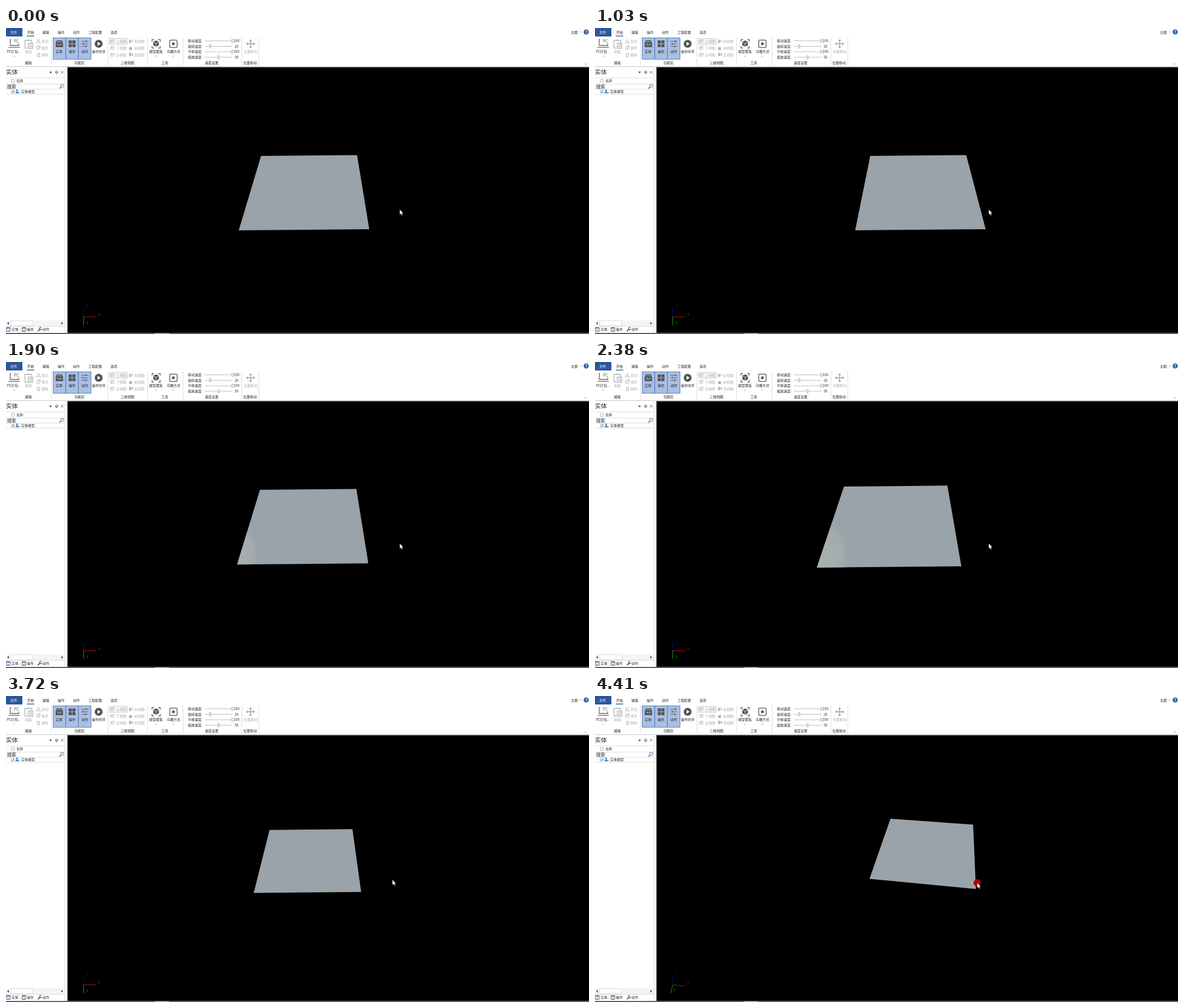
An HTML page for the animation above (4470 ms loop, 1032 px wide and 543 px high).

```html
<!DOCTYPE html>
<html lang="zh">
<head>
<meta charset="utf-8">
<style>
  html, body { margin: 0; width: 100%; height: 100%; overflow: hidden; background: #fff; }
  svg { display: block; }
  text { font-family: "Noto Sans CJK SC", "Noto Sans CJK", "Noto Sans", sans-serif; font-size: 6px; fill: #222; }
  .mid { text-anchor: middle; }
  .off { fill: #aaa; }
  .line { fill: none; stroke: #666; }
  .faint { fill: none; stroke: #b4b4b4; }
  .rule { fill: none; stroke: #ddd; }
</style>
</head>
<body>
<svg width="1032" height="543" viewBox="0 0 1032 543">
  <defs>
    <radialGradient id="glow" gradientUnits="userSpaceOnUse" cx="402" cy="345" r="56" gradientTransform="translate(402 345) scale(.86 1.25) translate(-402 -345)">
      <stop offset="0" stop-color="#a8b0af"/>
      <stop offset=".75" stop-color="#a3abae"/>
      <stop offset="1" stop-color="#9aa3a9" stop-opacity="0"/>
    </radialGradient>
    <g id="chev"><path d="M-1.5-.7 0 .8 1.5-.7" fill="none" stroke="#666" stroke-width=".7"/></g>
    <g id="cube"><path class="faint" d="M1 2h6l-2 2h-5zM0 4v3h5l2-2"/></g>
  </defs>
  <rect width="1032" height="543" fill="#fff"/>

  <!-- tab bar -->
  <rect width="29" height="15" fill="#2b579a"/>
  <rect x="37" y="13.5" width="13" height="1.5" fill="#2b6cb8"/>
  <use href="#chev" x="1017.5" y="7"/>
  <circle cx="1027" cy="7" r="4.5" fill="#2b62ae"/>
  <text class="mid" x="1027" y="9.7" style="fill:#fff;font-weight:700;font-size:7px">?</text>

  <!-- ribbon -->
  <path class="rule" d="M80.5 17V67M180.5 17V67M250.5 17V67M313.5 17V67M417.5 17V67M447.5 17V67"/>
  <path d="M0 68.5H1032" stroke="#c8c8c8"/>
  <path d="M1024.3 64.7l1.7-1.6 1.7 1.6" fill="none" stroke="#666" stroke-width=".7"/>
  <path class="line" stroke-width="1.3" d="M9 20.5H7.5V31H22.5V27.5M4.5 34.3H24.500"/>
  <text class="mid" x="18.500" y="25.500" style="font-size:7px;fill:#555">PC</text>
  <use href="#chev" x="14.500" y="50"/><use href="#chev" x="265.500" y="50"/><use href="#chev" x="296" y="50"/>
  <path class="faint" stroke="#aaa" stroke-width="1.3" d="M38 35.500H33.500V22H45.500V26M37 21.500H42.500M39.500 27H47.500V36H39.500zM41.500 30H46M41.500 33H46"/>
  <path class="faint" d="M54.500 20 60 26M60 20 54.500 26M54.500 33h4v5h-4zM56.500 31.500h4v5M54.500 45.500h6M55.500 46v5h4v-5"/>
  <circle class="faint" cx="55" cy="26" r="1"/><circle class="faint" cx="60" cy="26" r="1"/>

  <g fill="#a9bfe3" stroke="#3e6db5" stroke-width=".8">
    <rect x="83.400" y="17.400" width="22.400" height="38"/>
    <rect x="105.800" y="17.400" width="22.400" height="38"/>
    <rect x="128.200" y="17.400" width="22.400" height="38"/>
  </g>
  <g fill="#555">
    <path d="M90 22h9l2 5v7H88v-7z"/>
    <path d="M111 22h5.500v5.500H111zM117.500 22h5.500v5.500h-5.500zM111 28.500h5.500V34H111zM117.500 28.500h5.500V34h-5.500z"/>
    <circle cx="164" cy="28" r="7"/>
  </g>
  <path d="M91 24.500h7M90 28.500h2.500v2h4v-2h2.500" fill="none" stroke="#a9bfe3"/>
  <path class="line" d="M133.500 23.500h12M133.500 28h12M133.500 32.500h12"/>
  <path class="line" stroke-width="1.500" d="M142 21.800v3.400M137 26.300v3.400M141 30.800v3.400"/>
  <path d="M162 24.500v7l5.500-3.500z" fill="#fff"/>

  <rect x="183.500" y="18.500" width="31" height="10.500" fill="#f6f6f6" stroke="#ccc"/>
  <use href="#cube" x="185" y="19"/><use href="#cube" x="185" y="31"/><use href="#cube" x="185" y="43"/>
  <g fill="#b0b0b0">
    <path d="M218 22l3-2v6l-3 1zM222.500 20l2 2-2 5zM218 34h5v5h-5zM218 44h3v6h-3zM222 45h2.500v4H222z"/>
  </g>
  <path class="line" stroke-width="1.400" d="M258.500 24V20.500H262M269.500 20.500H273V24M258.500 32V35.500H262M269.500 35.500H273V32"/>
  <path d="M265.700 22l5 2.500v6l-5 3-5-3v-6z" fill="#555"/>
  <path d="M261 25l4.700 2.300L270.500 25M265.700 27.500V33" fill="none" stroke="#fff" stroke-width=".8"/>
  <rect class="line" x="289.800" y="21.500" width="13" height="13" rx="1.500" stroke-width="1.500"/>
  <rect x="294" y="25.800" width="4.500" height="4.500" fill="#555"/>
  <path d="M433 21v14M426 28h14M431 23l2-2 2 2M431 33l2 2 2-2M428 26l-2 2 2 2M438 26l2 2-2 2" fill="none" stroke="#a4a4a4" stroke-width="1.400"/>

  <!-- entity panel -->
  <path class="rule" d="M0 88.500H104M0 99.500H104M0 108.500H104M0 117.500H104M104.500 70V541"/>
  <path d="M76.500 77.500h5l-2.500 3z" fill="#444"/>
  <path d="M88 76.500h3.500v3H88zM87.300 79.500h4.800M89.700 79.500V82M97.300 76.300l4.200 4.400M101.500 76.300l-4.200 4.400" fill="none" stroke="#444" stroke-width=".8"/>
  <path d="M9.500 91.500h5v5h-5zM9.500 110.500h5v5h-5z" fill="#fff" stroke="#999" stroke-width=".7"/>
  <path d="M10.500 113l1.300 1.300 2.300-3" fill="none" stroke="#333" stroke-width=".8"/>
  <circle cx="99.500" cy="102.500" r="2.700" fill="none" stroke="#3a6ea5"/>
  <path d="M97.500 104.500l-3 3" stroke="#3a6ea5" stroke-width="1.400"/>
  <circle cx="19.500" cy="110.700" r="1.800" fill="#4a90d0"/>
  <path d="M16.800 116q.2-3.400 2.700-3.400t3 3.400z" fill="#4a90d0"/>
  <path d="M21 113h3v3h-3z" fill="#9ab"/>
  <rect x="0" y="519" width="104" height="10" fill="#f4f4f4"/>
  <rect x="8.500" y="519.500" width="39" height="9" fill="#fff" stroke="#ccc" stroke-width=".7"/>
  <path d="M5 521.500v5l-3-2.500zM98 521.500v5l3-2.500z" fill="#444"/>
  <path class="rule" d="M0 529.500H104M24.500 530V541"/>
  <path d="M.8 531.800h6.500v6.500H.8zM28.500 531.800H35v6.500h-6.500z" fill="#fff" stroke="#345f9e"/>
  <path d="M.5 532.200h7M28.200 532.200h7" stroke="#345f9e" stroke-width="1.500"/>
  <text class="mid" x="4" y="538" style="font-size:5px">1</text>
  <text class="mid" x="31.700" y="538" style="font-size:5px">2</text>
  <path d="M56.500 538l3.500-3.500" stroke="#345f9e" stroke-width="1.800"/>
  <path d="M62.300 531.500a2 2 0 1 0 1 2.500" fill="none" stroke="#345f9e" stroke-width="1.400"/>
  <g id="labels"></g>
  <g id="sliders"></g>

  <!-- 3D view -->
  <rect x="108" y="69" width="924" height="472" fill="#888"/>
  <rect x="109.500" y="70" width="922.500" height="471" fill="#000"/>
  <rect y="541.300" width="1032" height="1.700" fill="#33475a"/>
  <rect x="263" y="541.500" width="26" height="1.500" fill="#9aa7b0"/>
  <polygon id="plane" fill="#9aa3a9"/>
  <polygon id="sheen" fill="url(#glow)"/>
  <path d="M137.500 513V497" stroke="#0c0c70"/>
  <path id="axisX" stroke="#a81414"/>
  <path id="axisY" stroke="#14a014"/>
  <text class="mid" x="144" y="495.500" style="fill:#10107c">Z</text>
  <text class="mid" id="nameX" style="fill:#b41414">X</text>
  <text class="mid" id="nameY" style="fill:#14a014">Y</text>
  <circle id="press" r="6.500" fill="#a50808"/>
  <path id="cursor" d="M0 0V9.300L2.100 7.400 3.700 10.600 5.200 9.900 3.700 6.900H6.400z" fill="#fff" stroke="#222" stroke-width=".4"/>
</svg>
<script>
const $ = id => document.getElementById(id);
const set = (id, attrs) => { for (const k in attrs) $(id).setAttribute(k, attrs[k]); };

const label = (s, x, y, cls = "mid", size = 6) =>
  `<text class="${cls}" x="${x}" y="${y}" style="font-size:${size}px">${s}</text>`;
const row = (y, cls, items) => items.map(([s, x]) => label(s, x, y, cls)).join("");

$("labels").innerHTML =
  '<text class="mid" x="13.5" y="9.8" style="fill:#fff">文件</text>' +
  row(9.8, "mid", [["开始", 43.5], ["编辑", 70.5], ["操作", 97.5], ["动作", 124.5], ["工程配置", 158], ["选项", 191], ["主题", 1006]]) +
  row(44.2, "mid", [["PC打包...", 14], ["实体", 94], ["操作", 117], ["动作", 139.5], ["操作时序", 164], ["模型聚焦", 265.5], ["鸟瞰方式", 296.5]]) +
  row(44.2, "mid off", [["粘贴", 40], ["位置移动", 433]]) +
  row(63.5, "mid", [["编辑", 39.5], ["功能区", 130], ["三维视图", 215], ["工具", 281], ["速度设置", 364], ["位置移动", 432]]) +
  ["剪切", "拷贝", "删除"].map((s, i) => label(s, 63, 26 + 12 * i, "off")).join("") +
  ["上视图", "下视图", "左视图"].map((s, i) => label(s, 195, 26 + 12 * i, "off")).join("") +
  ["右视图", "前视图", "后视图"].map((s, i) => label(s, 227, 26 + 12 * i, "off")).join("") +
  label("实体", 0, 82, "", 10.5) + label("名称", 18.5, 96, "", 5.8) +
  label("搜索", 2, 106.8, "", 8) + label("实体模型", 27, 114.8, "") +
  row(537.3, "", [["实体", 10], ["操作", 37], ["动作", 64.5]]);

$("sliders").innerHTML = [["移动", 100], ["旋转", 20], ["平移", 100], ["缩放", 50]].map(([s, v], i) => {
  const y = 22.8 + 9.7 * i;
  return label(s + "速度:", 322, y + 2.2, "") + label(v, 408, y + 2.2) +
    `<path d="M352 ${y}H401" stroke="#bbb"/>` +
    `<rect x="${350.8 + v * .489}" y="${y - 3}" width="2.2" height="6" fill="#fff" stroke="#888" stroke-width=".6"/>`;
}).join("");

// keys: [time, value], linear in between
function track(keys, t) {
  const i = keys.findIndex(k => k[0] > t);
  if (i < 0) return keys[keys.length - 1][1];
  if (!i) return keys[0][1];
  const [t0, a] = keys[i - 1], [t1, b] = keys[i];
  return a + (b - a) * (t - t0) / (t1 - t0);
}

const SLIDE = [[70, 2], [300, 14], [600, 55], [790, 83], [830, 83], [1090, 41], [1360, 0], [1600, -38], [1640, -38], [1885, 0]];
const DOLLY = [[1885, 0], [2240, -.245], [2330, -.245], [2710, .015], [2780, .067], [3240, .38], [3440, .465]];
const YAW = [[3760, 0], [4050, 19], [4110, 19], [4410, 8.2]];
const LIFT = [[3760, 0], [4050, 24], [4110, 24], [4410, 14]];
const CURSOR_X = [[3510, 697], [3720, 684], [3760, 684], [4050, 665], [4110, 665], [4410, 676.5]];
const CURSOR_Y = [[3510, 322], [3720, 326], [3760, 326], [4050, 335], [4110, 335], [4410, 331.5]];

// plane corners in camera space (x right, y up, z depth)
const CORNERS = [[-.7115, .4586, 2.94], [.288, .4675, 2.94], [.303, -.225, 2.165], [-.697, -.2338, 2.165]];
const FOCAL = 500, UP_Y = .747, UP_Z = -.665;

function project([x, y, z], slide, dolly, yaw, lift) {
  x += slide * 2.165 / FOCAL;
  z += dolly;
  // turn about the world's up axis
  const c = Math.cos(yaw), s = Math.sin(yaw), d = (UP_Y * y + UP_Z * z) * (1 - c);
  const px = x * c + (UP_Y * z - UP_Z * y) * s;
  const py = y * c + UP_Z * x * s + UP_Y * d;
  const pz = z * c - UP_Y * x * s + UP_Z * d;
  return [571 + FOCAL * px / pz - lift * .35, 305 - FOCAL * py / pz - lift];
}

function draw(now) {
  const t = now % 4470;
  const yaw = track(YAW, t) * Math.PI / 180;
  const view = [track(SLIDE, t), track(DOLLY, t), yaw, track(LIFT, t)];
  const points = CORNERS.map(p => project(p, ...view).map(v => v.toFixed(2)).join()).join(" ");
  set("plane", { points });
  set("sheen", { points, opacity: track([[1100, 0], [1300, .7], [1600, 1], [2700, 1], [2780, .7], [3400, .5], [3700, 0]], t) });

  const c = Math.cos(yaw), s = Math.sin(yaw);
  const xx = 137.5 + 22 * c, xy = 512.5 + 14.5 * s, yx = 137.5 - 22 * s, yy = 512.5 + 14.5 * c;
  set("axisX", { d: `M137.5 512.5L${xx} ${xy}` });
  set("axisY", { d: `M137.5 512.5L${yx} ${yy}` });
  set("nameX", { x: xx + 5.5, y: xy - 1.2 });
  set("nameY", { x: yx + 6.5, y: yy - 1.5 });

  const move = { transform: `translate(${track(CURSOR_X, t)} ${track(CURSOR_Y, t)})` };
  set("cursor", move);
  set("press", { ...move, visibility: t >= 3760 ? "visible" : "hidden" });
  requestAnimationFrame(() => draw(performance.now() - start));
}
const start = performance.now();
draw(0);
</script>
</body>
</html>
```
